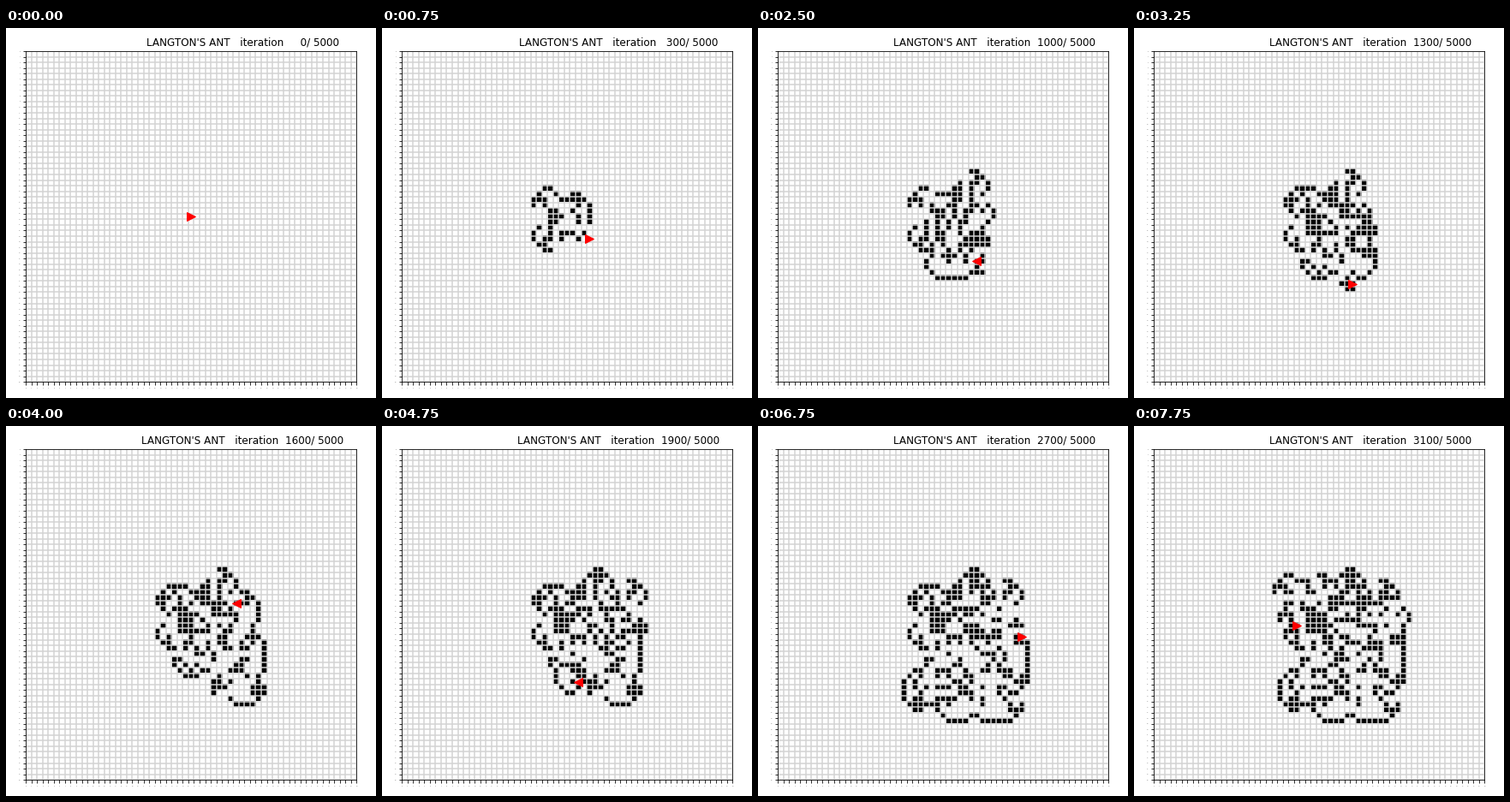
A matplotlib script that plays this animation: 432x432 px, repeating every 8 s.

```python
import matplotlib.pyplot as plt
import numpy as np
from matplotlib.animation import FuncAnimation

STAGE, DPI = 432, 72
SIZE = 59
FRAMES, INTERVAL = 32, 250
STEPS, TOTAL = 100, 5000
HEADINGS = [(1, 0), (0, 1), (-1, 0), (0, -1)]  # right, down, left, up
MARKERS = ">v<^"


def langton_states():
    """Grid, position and heading after every STEPS moves."""
    grid = np.zeros((SIZE, SIZE))
    x = y = SIZE // 2
    heading = 0
    states = []
    for _ in range(FRAMES):
        states.append((grid.copy(), x, y, heading))
        for _ in range(STEPS):
            turn = 1 if grid[y, x] == 0 else -1
            heading = (heading + turn) % 4
            grid[y, x] = 1 - grid[y, x]
            dx, dy = HEADINGS[heading]
            x, y = x + dx, y + dy
    return states


states = langton_states()

fig = plt.figure(figsize=(STAGE / DPI, STAGE / DPI), dpi=DPI)
side = 386.2
ax = fig.add_axes([23.1 / STAGE, 18.8 / STAGE, side / STAGE, side / STAGE])
image = ax.imshow(states[0][0], cmap="gray_r", vmin=0, vmax=1,
                  extent=(0, SIZE, SIZE, 0), interpolation="nearest")
ticks = np.arange(SIZE + 1)
ax.set_xticks(ticks)
ax.set_yticks(ticks)
ax.tick_params(labelsize=1)
ax.grid(color="lightgray", linewidth=1.5)
ant, = ax.plot([], [], color="red", markersize=10, linestyle="none")
title = fig.text(276.2 / STAGE, 1 - 21 / STAGE, "", fontsize=12,
                 ha="center", va="baseline")


def update(frame):
    grid, x, y, heading = states[frame]
    image.set_data(grid)
    ant.set_data([x + 0.5], [y + 0.5])
    ant.set_marker(MARKERS[heading])
    title.set_text(f"LANGTON'S ANT   iteration {frame * STEPS:5d}/{TOTAL:5d}")
    return image, ant, title


anim = FuncAnimation(fig, update, frames=FRAMES, interval=INTERVAL,
                     repeat=True, repeat_delay=0)
plt.show()
```
